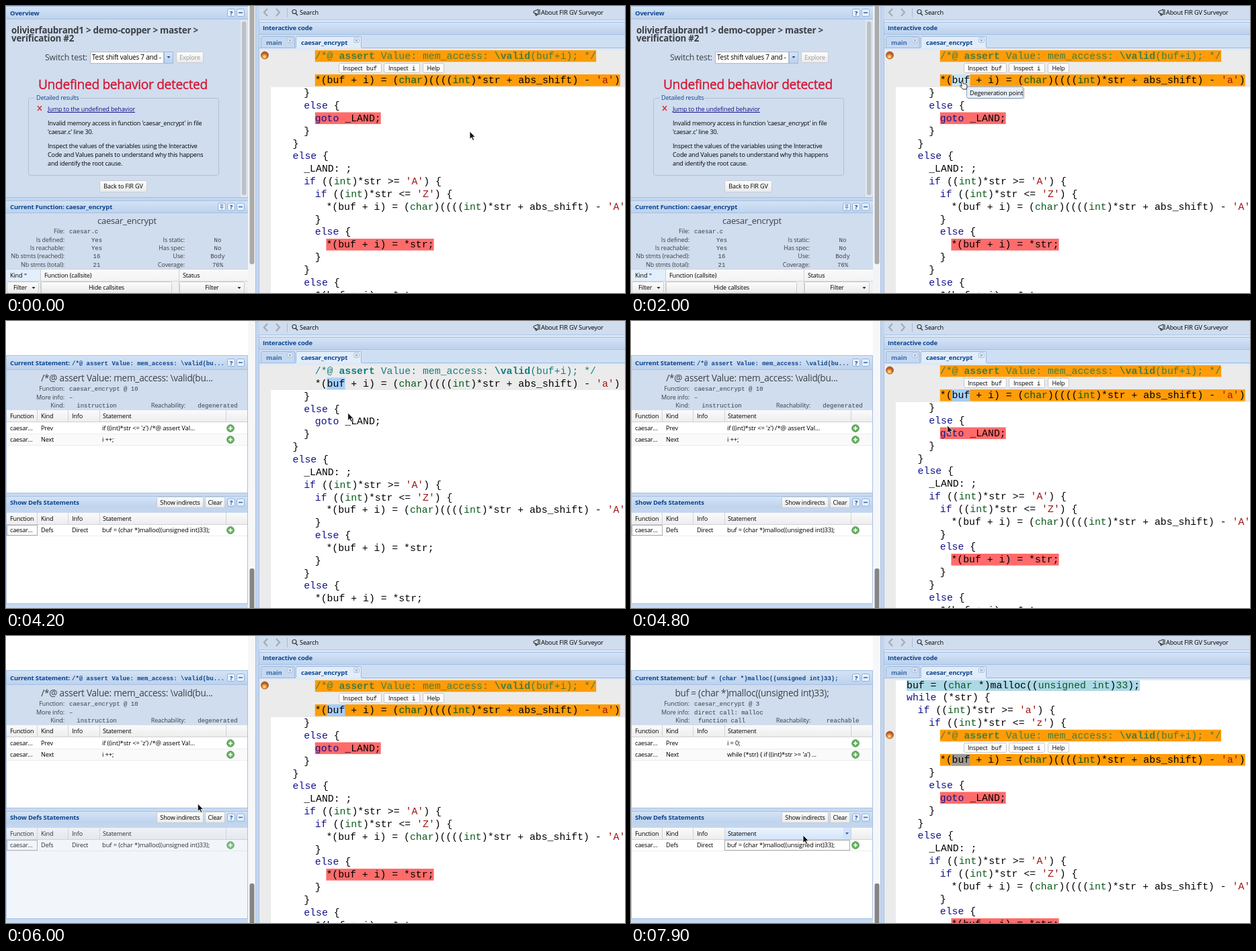
Animation, 921 px wide and 428 px high, one loop 8000 ms. Source, as an HTML page:

```html
<!DOCTYPE html>
<html lang="en">
<head>
<meta charset="utf-8">
<title>Code analysis walkthrough</title>
<style>
html, body { margin: 0; width: 100%; height: 100%; overflow: hidden; background: #fff; }
svg { display: block; }
text { font: 9.1px "Open Sans", "Noto Sans", sans-serif; letter-spacing: -.018em; white-space: pre; fill: #000; }
.b { font-weight: 700; }
.nav { fill: #0c448f; }
.soft { fill: #3c4046; }
.dim { fill: #999; }
.alert { fill: #d5122f; stroke: #d5122f; stroke-width: .3; }
.m { font-family: "Liberation Mono", "DejaVu Sans Mono", monospace; letter-spacing: 0; }
.mid { text-anchor: middle; }
.end { text-anchor: end; }
.kw { fill: #12128c; }
.ty { fill: #0b5a1c; }
.st { fill: #a01414; }
.cm { fill: #127f82; }
.hot .cm { fill: #477d3c; }
</style>
</head>
<body>
<svg id="stage" width="921" height="428" viewBox="0 0 921 428"></svg>
<script>
const LOOP = 8000;
const stage = document.getElementById('stage');
const esc = s => s.replace(/&/g, '&amp;').replace(/</g, '&lt;');

const rect = (x, y, w, h, fill, stroke, r = 0) =>
  `<rect x="${x}" y="${y}" width="${w}" height="${h}" rx="${r}" fill="${fill}"${stroke ? ` stroke="${stroke}"` : ''}/>`;
const path = (d, stroke, w = 1, fill = 'none') =>
  `<path d="${d}" fill="${fill}" stroke="${stroke}" stroke-width="${w}"/>`;
const raw = (x, y, html, cls = '', size = 9.1) =>
  `<text x="${x}" y="${y}" class="${cls}" style="font-size:${size}px">${html}</text>`;
const text = (x, y, s, cls, size) => raw(x, y, esc(s), cls, size);
const mono = (x, y, s, cls = '') => text(x, y, s, 'm soft ' + cls, 9);
const group = (id, ...parts) => `<g id="${id}">${parts.join('')}</g>`;
const grad = (id, a, b) =>
  `<linearGradient id="${id}" x2="0" y2="1"><stop stop-color="${a}"/><stop offset="1" stop-color="${b}"/></linearGradient>`;
const down = (x, y, c = '#222') => path(`M${x - 2.5} ${y}h5l-2.5 3z`, 'none', 0, c);

const button = (x, y, w, h, label, cls = '') =>
  rect(x + .5, y + .5, w - 1, h - 1, 'url(#btn)', '#c9ccd0', 2) +
  text(x + w / 2, y + h / 2 + 3.3, label, 'mid ' + cls);

const tool = (x, y, ch) => rect(x + .5, y + .5, 11, 11, '#e6f0fc', '#8fb1dd', 2) +
  (ch === '-' ? path(`M${x + 3} ${y + 6}h6`, '#3c6ca8', 1.6)
   : ch === 'pin' ? path(`M${x + 4} ${y + 3}h4M${x + 5} ${y + 3}v4h2v-4M${x + 3.5} ${y + 7}h5M${x + 6} ${y + 7}v3`, '#6f8db6')
   : text(x + 6, y + 9.5, ch, 'b nav mid'));

const header = (y, h, title) => rect(0, y, 360, h, 'url(#head)') +
  path(`M0 ${y + .5}h360M0 ${y + h - .5}h360`, '#a5c1e5') +
  text(6, y + h / 2 + 3.5, title, 'b nav', 9.5) +
  tool(329, y + h / 2 - 6, '?') + tool(343, y + h / 2 - 6, '-');

const plus = y => `<circle cx="334" cy="${y}" r="5.4" fill="#66b160" stroke="#4b944a" stroke-width=".8"/>` +
  path(`M331 ${y}h6M334 ${y - 3}v6`, '#fff', 1.7);

const columns = (y, h) => rect(0, y, 360, h, 'url(#cols)') +
  path(`M0 ${y + h - .5}h360M46.5 ${y}v${h}M92.5 ${y}v${h}M139.5 ${y}v${h}M327.5 ${y}v${h}`, '#d0d2d5') +
  [[6, 'Function'], [52, 'Kind'], [98, 'Info'], [144, 'Statement']]
    .map(([x, s]) => text(x, y + h / 2 + 3.3, s)).join('');

const row = (y, kind, info, code) => text(6, y + 3, 'caesar...') + text(52, y + 3, kind) +
  text(98, y + 3, info) + text(143, y + 3, code, '', 9.5) + plus(y) + path(`M0 ${y + 8.5}h360`, '#ededed');

const dotted = (x, y, w, h) =>
  `<rect x="${x}" y="${y}" width="${w}" height="${h}" fill="none" stroke="#555" stroke-dasharray="1 1"/>`;

// Left side, first view
function overview() {
  const pairs = [['Is defined:', 'Yes', 'Is static:', 'No'], ['Is reachable:', 'Yes', 'Has spec:', 'No'],
    ['Nb stmts (reached):', '16', 'Use:', 'Body'], ['Nb stmts (total):', '21', 'Coverage:', '76%']];
  const body = ["Invalid memory access in function 'caesar_encrypt' in file", "'caesar.c' line 30.",
    'Inspect the values of the variables using the Interactive', 'Code and Values panels to understand why this happens',
    'and identify the root cause.'];
  return rect(0, 0, 360, 428, '#d0ddee') + header(0, 20, 'Overview') +
    rect(349, 21, 10, 265, '#e2e8f1') + rect(351, 23, 6.5, 259, '#bdc0c5', '', 3) +
    text(8, 41, 'olivierfaubrand1 > demo-copper > master >', 'b soft', 13.4) +
    text(8, 53, 'verification #2', 'b soft', 13.4) +
    text(58, 81, 'Switch test:', 'soft', 12.4) +
    rect(125.5, 68.5, 109, 17, '#fff', '#b5b8c8') + text(128, 80, 'Test shift values 7 and -', '', 9.9) +
    rect(235.5, 68.5, 13, 17, 'url(#head)', '#9fb9da') + down(242, 75, '#234f8c') +
    button(253, 68, 41, 17, 'Explore', 'dim') +
    text(48, 123.5, 'Undefined behavior detected', 'alert', 19.2) +
    rect(33.5, 137.5, 283, 115, 'none', '#aebfd8', 3) + rect(42, 134, 67, 8, '#d0ddee') +
    text(45, 140, 'Detailed results', 'nav') +
    path('M47 149l6 7M53 149l-6 7', '#d23a3f', 1.6) +
    text(62, 157, 'Jump to the undefined behavior', 'kw') + path('M62 158.5h130', '#12128c') +
    body.map((s, i) => text(62, [178, 191, 212, 225, 238][i], s)).join('') +
    button(139, 260, 71, 18, 'Back to FIR GV') +
    rect(0, 285, 360, 5, '#c3d6ee') + path('M0 285.5h360', '#a5c1e5') +
    header(290, 19, 'Current Function: caesar_encrypt') + tool(315, 293.5, 'pin') +
    text(180, 325, 'caesar_encrypt', 'mid soft', 13) +
    text(87, 339, 'File:', 'end soft') + mono(94, 339, 'caesar.c') +
    pairs.map(([a, b, c, d], i) => {
      const y = 352 + i * 12.2;
      return text(87, y, a, 'end soft') + mono(135, y, b, 'mid') + text(266, y, c, 'end soft') + mono(315, y, d, 'mid');
    }).join('') +
    rect(0, 392, 360, 36, 'url(#cols)') + rect(0, 392, 52, 18, '#e3eefb') +
    path('M0 392.5h360M0 410.5h360M51.5 392v36M257.5 392v36', '#cfd2d6') +
    text(6, 404.5, 'Kind') + down(29, 399, '#4a86c9') + text(57, 404.5, 'Function (callsite)') + text(263, 404.5, 'Status') +
    button(1, 411, 48, 18, '') + text(11, 423, 'Filter') + down(41, 419) +
    button(52, 411, 195, 18, 'Hide callsites') +
    button(258, 411, 97, 18, 'Filter') + down(347, 419) +
    rect(360, 0, 11, 428, '#f3f4f6') + rect(362.5, -5, 7, 390, '#ababab', '', 3);
}

// Left side, second view
const statement = (id, title, where, more, kind, reach, prev, next) => group(id,
  header(51, 22, 'Current Statement:'), text(98, 66, title, 'b m nav', 9),
  text(180, 90, title, 'mid soft', 13.6),
  ['Function:', 'More info:', 'Kind:'].map((s, i) => text(87, 104 + i * 12.5, s, 'end soft')).join(''),
  mono(94, 104, where), mono(94, 116.5, more), mono(135, 129, kind, 'mid'),
  text(267, 129, 'Reachability:', 'end soft'), mono(315, 129, reach, 'mid'),
  columns(133, 18), row(160, 'Prev', '', prev), row(177, 'Next', '', next));

const malloc = 'buf = (char *)malloc((unsigned int)33);';
const details = () => rect(0, 0, 360, 51, '#fff') + rect(0, 51, 360, 82, '#d0ddee') +
  rect(0, 133, 360, 123, '#fff') + rect(0, 168, 360, 17, '#fafafa') +
  statement('stmtA', '/*@ assert Value: mem_access: \\valid(bu...', 'caesar_encrypt @ 10', '–',
    'instruction', 'degenerated', "if ((int)*str <= 'z') /*@ assert Val...", 'i ++;') +
  statement('stmtB', malloc, 'caesar_encrypt @ 3', 'direct call: malloc',
    'function call', 'reachable', 'i = 0;', "while (*str) { if ((int)*str >= 'a') ...") +
  rect(0, 256, 360, 172, '#c8daf1') + header(261, 19, 'Show Defs Statements') +
  rect(0, 279, 360, 7, '#c3d6ee') +
  button(224, 262, 70, 17, 'Show indirects') + button(296, 262, 30, 17, 'Clear') +
  group('defs', rect(0, 286, 360, 135, '#fff'), columns(286, 18),
    group('rowHover', rect(0, 304, 360, 17, '#efefef')),
    group('headHover', rect(140, 286, 187, 17, 'url(#hover)'), text(144, 298.3, 'Statement'),
      rect(316, 286, 11, 17, '#cfe2f8'), down(321.5, 293, '#2f65a8')),
    row(312, 'Defs', 'Direct', malloc),
    group('focusA', dotted(1.5, 304.5, 45, 15)), group('focusB', dotted(139.5, 304.5, 186, 15))) +
  path('M.5 51v370M359.5 51v370M0 256.5h360M0 421.5h360', '#a5c1e5') +
  rect(360, 0, 11, 428, '#f6f7f8') + rect(362.5, 369, 7, 65, '#858585', '', 3);

// Right side frame
const closeBox = x => rect(x - 3.5, 47.5, 8, 7, '#e9f1fb', '#a9bfdd', 1) + path(`M${x - 1.5} 49.5l4 3.5m0-3.5l-4 3.5`, '#6f8cb3');
const chrome = () => rect(371, 0, 6, 428, '#c3d6ee') + path('M371.5 0v428M376.5 21v407', '#a5c1e5') +
  rect(377, 0, 544, 20, '#d0ddee') + path('M377 20.5h544', '#b2c8e5') + rect(377, 21, 544, 3, '#d9e6f6') +
  path('M389 4l-5 5.5 5 5.5M402 4l5 5.5-5 5.5', '#a4abb5', 2.2) + path('M418.5 3v14', '#a9bcd5') +
  `<circle cx="429" cy="8.5" r="3" fill="none" stroke="#333" stroke-width="1.1"/>` + path('M431 11l3 3', '#333', 1.4) +
  text(437, 13, 'Search', '', 9.2) +
  path('M785 8l7-3v8l-7-3zM787 10l1 4h2l-1-3M794 5v8', '#222', 1) + text(796, 13, 'About FIR GV Surveyor', '', 9.2) +
  rect(377, 24, 544, 18, 'url(#head)') + path('M377 24.5h544M377 42.5h544', '#a5c1e5') +
  text(382, 35.5, 'Interactive code', 'b nav', 9.5) +
  rect(377, 43, 544, 23, '#cfdff3') +
  rect(379.5, 45.5, 50, 18, '#c6d9f1', '#9bb8dd', 2) + `<g opacity=".75">${text(387, 58, 'main', 'b nav', 9.5)}</g>` +
  rect(431.5, 45.5, 97, 20, '#e2edfa', '#9bb8dd', 2) + text(439, 58, 'caesar_encrypt', 'b nav', 9.5) +
  closeBox(422) + closeBox(521) + rect(377, 62, 544, 4, '#dfe9f6') + path('M377 62.5h54M529 62.5h392', '#9bb8dd');

// Source listing: indent level, text, red highlight
const PITCH = 18.85, CHAR = 8.9, GAP = 17.4, FIRST = -4;
const LINES = [
  [0, malloc], [0, 'while (*str) {'], [1, "if ((int)*str >= 'a') {"], [2, "if ((int)*str <= 'z') {"],
  [3, '/*@ assert Value: mem_access: \\valid(buf+i); */'],
  [3, "*(buf + i) = (char)((((int)*str + abs_shift) - 'a')"],
  [2, '}'], [2, 'else {'], [3, 'goto _LAND;', 1], [2, '}'], [1, '}'], [1, 'else {'], [2, '_LAND: ;'],
  [2, "if ((int)*str >= 'A') {"], [3, "if ((int)*str <= 'Z') {"],
  [4, "*(buf + i) = (char)((((int)*str + abs_shift) - 'A')"],
  [3, '}'], [3, 'else {'], [4, '*(buf + i) = *str;', 1], [3, '}'], [2, '}'], [2, 'else {'], [3, '*(buf + i) = *str;']];

const span = (cls, s) => `<tspan class="${cls}">${s}</tspan>`;
const paint = s => s.startsWith('/*')
  ? span('cm', s.replace(/assert|\\valid/g, w => span('cm b', w)))
  : esc(s).replace(/\b(if|else|goto|while)\b|\b(int|char|unsigned|33)\b|'.'/g,
      (w, kw, ty) => span(kw ? 'kw' : ty ? 'ty' : 'st', w));

function listing(hot, scroll, selections) {
  let out = '';
  const baseY = n => 79 + n * PITCH + (hot && n > 0 ? GAP : 0) + scroll;
  if (!scroll) out += rect(394, 66, 527, hot ? 55 : 37, '#ebebeb');
  const marks = [];
  LINES.forEach(([level, s, red], i) => {
    const n = i + FIRST, x = 410 + level * 16.6, y = baseY(n), top = y - 13.3;
    const fill = !hot ? '' : n === 0 || n === 1 ? '#ff9c08' : red ? '#ff6b6b' : scroll && n === FIRST ? '#add8e6' : '';
    if (fill) out += rect(x, top, s.length * CHAR, 17.6, fill);
    if (n === 1) for (const [id, c] of selections) out += group(id, rect(477.5, top, 27, 17.6, c));
    marks.push(raw(x, y, paint(s), 'm', CHAR / .6));
  });
  out += marks.join('');
  if (hot) {
    const y = 85 + scroll, chip = (x, w) => rect(x + .5, y + .5, w - 1, 14, '#fcfcfc', '#c6c6c6', 2);
    out += chip(495, 64) + chip(562, 54) + chip(620, 32) +
      text(501, y + 10.5, 'Inspect') + text(536, y + 10.5, 'buf', 'm', 9) +
      text(569, y + 10.5, 'Inspect') + text(604, y + 10.5, 'i', 'm', 9) + text(636, y + 10.5, 'Help', 'mid') +
      `<circle cx="385" cy="${73.5 + scroll}" r="5.5" fill="url(#ball)" stroke="#9a5a32" stroke-width=".8"/>`;
  }
  return `<g clip-path="url(#code)" class="${hot ? 'hot' : ''}">${rect(377, 66, 17, 362, '#ebebeb')}${out}</g>`;
}

const popups = () =>
  group('tip', rect(501, 122, 85, 17, '#0002', '', 2), rect(499.5, 120.5, 84, 17, '#e7effa', '#8ea6c8', 2),
    text(504, 132.5, 'Degeneration point')) +
  group('menu', rect(493, 116, 145, 98, '#0001', '', 2), rect(491.5, 114.5, 144, 97, '#f1f1f1', '#a3b6d6'),
    group('pick', rect(494.5, 134.5, 140, 18, 'url(#hover)', '#a6c8f2', 2)),
    ['Track this term', 'Show Defs', 'Show Defs [..]', 'Occurrence', 'Copy']
      .map((s, i) => text(497, 126.8 + i * 19.8, s)).join(''),
    text(630, 126.8, 'Ctrl+<left click>', 'dim end'));

stage.innerHTML = `<defs>${grad('head', '#d6e4f6', '#bbd1ec')}${grad('btn', '#fdfdfd', '#e9eaec')}
${grad('cols', '#fafafa', '#ededee')}${grad('hover', '#ecf4fe', '#d3e4fa')}
<radialGradient id="ball" cx=".45" cy=".7"><stop stop-color="#fff3b0"/><stop offset=".5" stop-color="#f59a32"/><stop offset="1" stop-color="#b5562a"/></radialGradient>
<clipPath id="code"><rect x="377" y="66" width="544" height="362"/></clipPath></defs>` +
  rect(0, 0, 921, 428, '#fff') + group('overview', overview()) + group('details', details()) + chrome() +
  group('codeHot', listing(true, 0, [['selHover', '#c8e4f5'], ['selOn', '#a5cdf6']])) +
  group('codePlain', listing(false, 0, [['selPlain', '#a5d0fa']])) +
  group('codeMoved', listing(true, 74, [['selGrey', '#a19a90']])) +
  popups() +
  group('cursor',
    group('arrow', path('M0 0v11.5l2.7-2.4 1.9 4.3 2-.9-1.9-4.1h3.6z', '#fff', .8, '#111')),
    group('hand', path('M0 1.5q1.3-1.4 2.2 0l1.2 3.6q1-.7 1.8.2q1-.6 1.8.3q1.4-.3 1.7 1.2l.3 3.3-1 3H2.8L-1.3 8.6q-.4-1.6 1-1.2l1.6 1.3z', '#111', .9, '#fff')));

const node = {};
stage.querySelectorAll('g[id]').forEach(g => node[g.id] = g);
const show = (id, on) => node[id].style.display = on ? '' : 'none';

// time, x, y of the pointer tip
const TRACK = [[0, 690, 187], [500, 690, 187], [1500, 491, 111], [2400, 491, 111], [3000, 507, 137], [4600, 509, 137],
  [5350, 292, 243], [5800, 292, 243], [6800, 228, 310], [7400, 228, 310], [7850, 256, 297], [LOOP, 256, 297]];

function pointer(t) {
  const i = TRACK.findIndex(k => k[0] > t);
  const [t0, x0, y0] = TRACK[i - 1], [t1, x1, y1] = TRACK[i];
  const u = (t - t0) / (t1 - t0), e = u * u * (3 - 2 * u);
  return [x0 + (x1 - x0) * e, y0 + (y1 - y0) * e];
}

function draw(t) {
  const within = (a, b) => t >= a && t < b;
  const switched = t >= 3600, moved = t >= 7500, plain = within(3600, 4800);
  const [x, y] = pointer(t);
  show('overview', !switched);
  show('details', switched);
  show('stmtA', !moved);
  show('stmtB', moved);
  show('codePlain', plain);
  show('codeMoved', moved);
  show('codeHot', !plain && !moved);
  show('selHover', within(1450, 2400));
  show('selOn', t >= 2400);
  show('tip', within(1750, 2400));
  show('menu', within(2500, 3600));
  show('pick', y > 134);
  show('focusA', t < 6900);
  show('focusB', t >= 6900);
  show('rowHover', t > 6000 && y > 304);
  show('headHover', t > 7400 && y < 304);
  node.defs.setAttribute('opacity', within(4900, 6100) ? 1 - .88 * Math.sin(Math.PI * (t - 4900) / 1200) : 1);
  const hand = within(1400, 3600);
  show('hand', hand);
  show('arrow', !hand);
  node.cursor.setAttribute('transform', `translate(${x.toFixed(1)} ${y.toFixed(1)})`);
}

const start = performance.now();
function tick() {
  draw((performance.now() - start) % LOOP);
  requestAnimationFrame(tick);
}
tick();
</script>
</body>
</html>
```
